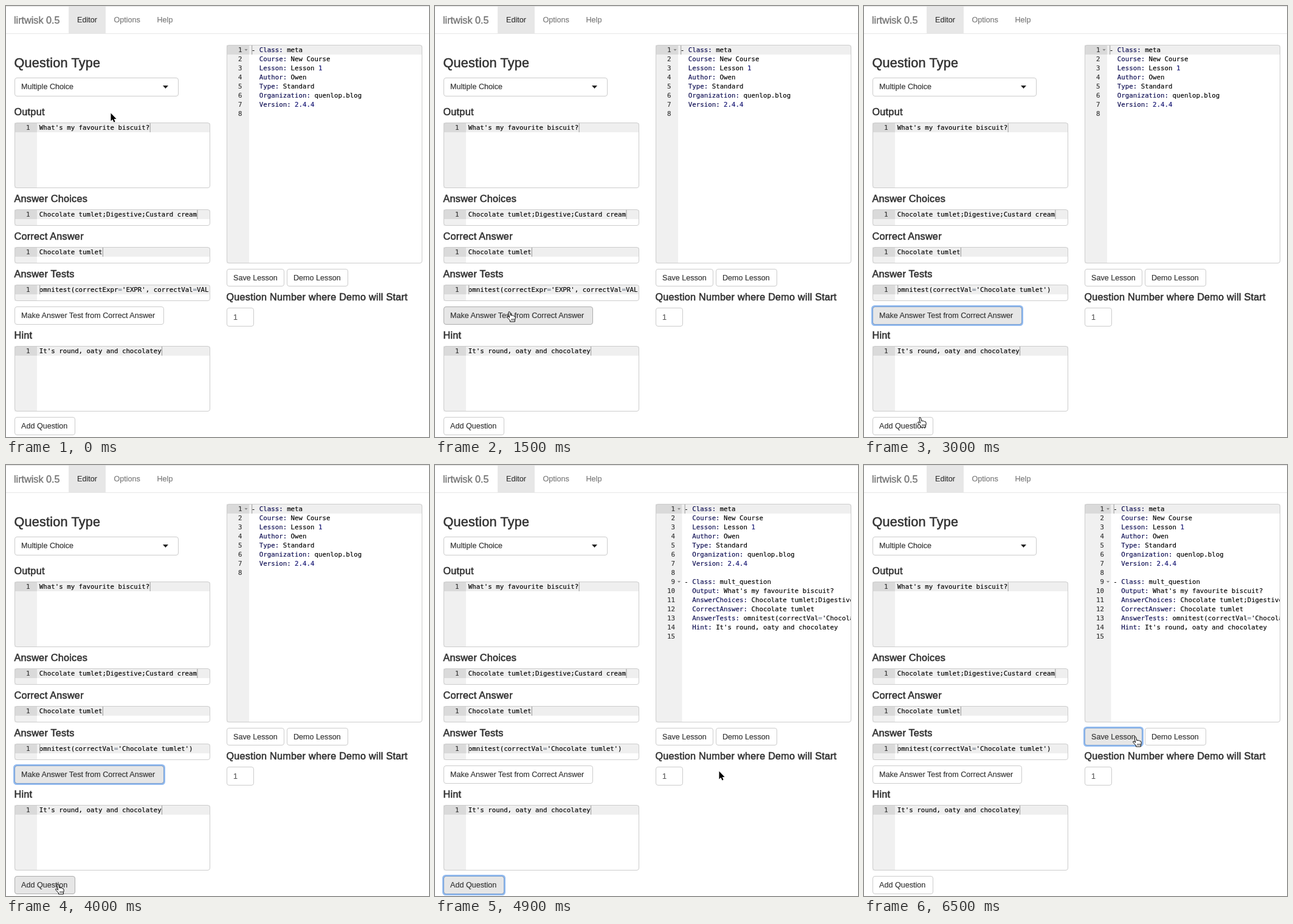
An HTML page that plays this animation: 696 by 710 pixels, repeating every 6.6 s.

```html
<!DOCTYPE html>
<html lang="en">
<head>
<meta charset="utf-8">
<title>Lesson editor</title>
<style>
  html, body { margin: 0; width: 100%; height: 100%; overflow: hidden; background: #fff; }
  #stage { display: block; width: 696px; height: 710px; }
  text, tspan { fill: currentColor; stroke: currentColor; }
  text { font: 12.6px "Liberation Sans", Arial, sans-serif; color: #333; stroke-width: .15px; white-space: pre; }
  .brand { font-size: 16.2px; color: #777; stroke-width: .4px; }
  .link { color: #777; }
  .field { color: #555; }
  .title, .label { stroke-width: .6px; }
  .title { font-size: 21.6px; letter-spacing: .01em; }
  .label { font-size: 16.2px; letter-spacing: .016em; }
  .code { font: 10.77px "DejaVu Sans Mono", monospace; color: #000; }
  .number { color: #333; text-anchor: end; }
  .key { color: #0a0a50; }
  .value { color: #101070; }
  .operator { color: #687687; }
</style>
</head>
<body>
<svg id="stage" viewBox="0 0 696 710"></svg>
<script>
const LOOP = 6600, STEP = 100, CHAR = 6.48, LINE = 15;
const MAKE_FOCUS = 1600, TEST_FILLED = 2200, ADD_FOCUS = 4200, QUESTION_ADDED = 4400, SAVE_FOCUS = 5700;

const output = "What's my favourite biscuit?";
const answer = "Chocolate tumlet";
const choices = answer + ";Digestive;Custard cream";
const hint = "It's round, oaty and chocolatey";
const emptyTest = "omnitest(correctExpr='EXPR', correctVal=VAL)";
const filledTest = `omnitest(correctVal='${answer}')`;

const lesson = ["- Class: meta", "  Course: New Course", "  Lesson: Lesson 1", "  Author: Owen",
  "  Type: Standard", "  Organization: quenlop.blog", "  Version: 2.4.4", ""];
const question = ["- Class: mult_question", "  Output: " + output, "  AnswerChoices: " + choices,
  "  CorrectAnswer: " + answer, "  AnswerTests: " + filledTest, "  Hint: " + hint, ""];

const buttons = [
  { label: "Make Answer Test from Correct Answer", x: 14, y: 495, w: 246, h: 30, focus: [MAKE_FOCUS, ADD_FOCUS] },
  { label: "Add Question", x: 14, y: 677, w: 100, h: 30, focus: [ADD_FOCUS, SAVE_FOCUS] },
  { label: "Save Lesson", x: 363, y: 433, w: 95, h: 29, focus: [SAVE_FOCUS, LOOP] },
  { label: "Demo Lesson", x: 462, y: 433, w: 101, h: 29, focus: [0, 0] }
];

// Pointer stops: time, x, y
const path = [[0, 172, 176], [600, 150, 290], [700, 150, 290], [1100, 124, 497], [1400, 122, 504],
  [2400, 122, 504], [3000, 92, 678], [3300, 85, 691], [4200, 85, 691], [4600, 440, 535],
  [4900, 467, 504], [5100, 467, 504], [5600, 446, 448], [LOOP, 446, 448]];

function pointerAt(time) {
  const t = Math.max(0, time);
  const i = path.findIndex(stop => stop[0] > t);
  const [t0, x0, y0] = path[i - 1], [t1, x1, y1] = path[i];
  const u = (t - t0) / (t1 - t0), k = u * u * (3 - 2 * u);
  return { x: x0 + (x1 - x0) * k, y: y0 + (y1 - y0) * k };
}

const inside = (p, b) => p.x >= b.x && p.x <= b.x + b.w && p.y >= b.y && p.y <= b.y + b.h;
const text = (x, y, s, cls = "") => `<text x="${x}" y="${y}" class="${cls}">${s}</text>`;
const span = (s, cls) => `<tspan class="${cls}">${s}</tspan>`;
const rect = (x, y, w, h, fill) => `<rect x="${x}" y="${y}" width="${w}" height="${h}" fill="${fill}"/>`;
const frame = (x, y, w, h, fill = "none", stroke = "#ccc") =>
  `<rect x="${x + .5}" y="${y + .5}" width="${w - 1}" height="${h - 1}" rx="3.5" fill="${fill}" stroke="${stroke}"/>`;

const highlight = line => line
  .replace(/=|\b\d[\d.]*$/g, m => m === "=" ? span(m, "operator") : span(m, "value"))
  .replace(/^([- ] )(\w+:)/, (_, lead, key) => lead + span(key, "key"));

function editor(x, y, w, h, lines, caretColumn = lines[0].length) {
  const gutter = 37 + (lines.length > 9 ? CHAR : 0), left = gutter + 3.8;
  const rows = lines.map((line, i) => {
    const base = 12 + i * LINE, fold = gutter - 5;
    return text(gutter - 11.4, base, i + 1, "code number") + text(left, base, highlight(line), "code") +
      (line.startsWith("- ") ? `<path d="M${fold - 2.5} ${base - 5}h5l-2.5 3z" fill="#888"/>` : "");
  });
  return `<svg x="${x}" y="${y}" width="${w}" height="${h}">` +
    rect(0, 0, gutter, h, "#f0f0f0") + rect(0, 1, gutter, LINE, "#dadada") +
    rect(gutter, 1, w, LINE, "#efefef") + rows.join("") +
    rect(left + caretColumn * CHAR + .4, 1, 1, LINE, "#999") + "</svg>" + frame(x, y, w, h);
}

function button(b, t, hoverPoint) {
  const hover = inside(hoverPoint, b), focus = t >= b.focus[0] && t < b.focus[1];
  const border = hover ? "#adadad" : focus ? "#8c8c8c" : "#ccc";
  const ring = focus ? `<rect x="${b.x - .5}" y="${b.y - .5}" width="${b.w + 1}" height="${b.h + 1}" rx="4" fill="none" stroke="#6fa5ea" stroke-opacity=".75" stroke-width="3"/>` : "";
  return frame(b.x, b.y, b.w, b.h, hover || focus ? "#e6e6e6" : "#fff", border) + ring +
    text(b.x + 11, b.y + 19, b.label);
}

function pointer(p) {
  const shape = buttons.some(b => inside(p, b))
    ? `<g transform="translate(-4 -1)" stroke="#000" stroke-linejoin="round">
        <path fill="#fff" d="M5.5 17V15L1 10.2Q0 8 2.2 8.1L4.6 10.2 2.9 2.2Q2.9.5 4.2.6 5.3.8 5.6 2.2L6.8 6.8Q8 5.6 9.2 7 10.6 6 11.6 7.7 13.5 7 14 9.2 14.6 11.5 13.4 14.8V17Z"/>
        <path stroke-width=".8" d="M8 12v3M10 12v3M12 12v3"/></g>`
    : `<path d="M.5.5V13.5L3.4 10.8 5.5 15.6 7.6 14.6 5.6 9.9H9.6Z" stroke="#fff" stroke-width="1.6" paint-order="stroke"/>`;
  return `<g transform="translate(${p.x} ${p.y})">${shape}</g>`;
}

const page =
  rect(103, 0, 61, 45, "#e7e7e7") + rect(0, 45, 696, 1, "#e7e7e7") + rect(0, 0, 696, 1, "#ddd") +
  text(13, 29, "lirtwisk 0.5", "brand") + text(117, 27, "Editor") +
  text(177.5, 27, "Options", "link") + text(248.5, 27, "Help", "link") +
  text(13.5, 101, "Question Type", "title") +
  frame(14, 118, 270, 31) + text(25, 137, "Multiple Choice") +
  `<path d="M258 131h9l-4.5 5z" fill="#222"/>` +
  [[13.5, 180, "Output"], [13.5, 323, "Answer Choices"], [13.5, 385, "Correct Answer"], [13.5, 447, "Answer Tests"],
   [13.5, 548, "Hint"], [362.5, 485, "Question Number where Demo will Start"]]
    .map(([x, y, s]) => text(x, y, s, "label")).join("") +
  frame(363, 497, 45, 31) + text(374, 517, "1", "field") +
  editor(14, 192, 322, 108, [output]) +
  editor(14, 335, 322, 27, [choices]) +
  editor(14, 397, 322, 27, [answer]) +
  editor(14, 560, 322, 108, [hint]);

function render(t) {
  const hoverPoint = pointerAt(t - STEP); // buttons react one step after the pointer arrives
  return page +
    editor(14, 459, 322, 27, [t < TEST_FILLED ? emptyTest : filledTest], 0) +
    editor(363, 64, 322, 360, t < QUESTION_ADDED ? lesson : lesson.concat(question), 0) +
    buttons.map(b => button(b, t, hoverPoint)).join("") +
    pointer(pointerAt(t));
}

const stage = document.getElementById("stage");
const start = performance.now();
let shown = -1;

function tick() {
  const t = Math.floor((performance.now() - start) % LOOP / STEP) * STEP;
  if (t !== shown) stage.innerHTML = render(shown = t);
  requestAnimationFrame(tick);
}
tick();
</script>
</body>
</html>
```
